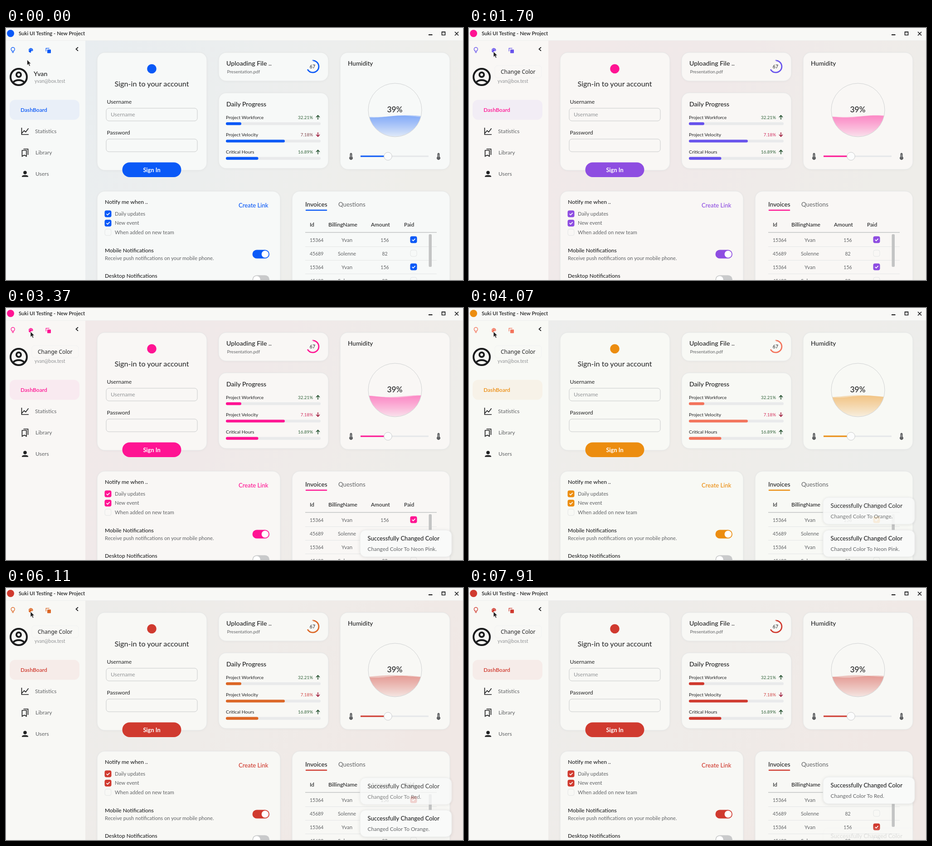
Recreate the animation shown at these times as an HTML page. Size 1008 by 556 pixels, loop 8000 ms.

```html
<!DOCTYPE html>
<html lang="en">
<head>
<meta charset="utf-8">
<title>Dashboard colour themes</title>
<style>
  html, body { margin: 0; width: 100%; height: 100%; overflow: hidden; }
  svg { display: block; width: 100%; height: 100%; }
  text { font-family: Lato, "Open Sans", sans-serif; fill: #202122; }
  .medium { font-weight: 500; }
  .semi { font-weight: 600; }
  .soft { fill: #626466; }
  .pale { fill: #929496; }
  .card { fill: var(--card); stroke: #e3e5e5; }
  .now { fill: var(--now); }
  .mid { fill: var(--mid); }
  .slow { fill: var(--slow); }
  .line { fill: none; stroke: #202122; stroke-width: 1.7; }
  .dark { fill: #202122; }
  .good { fill: #2f6238; }
</style>
</head>
<body>
<svg id="stage" viewBox="0 0 1008 556" xmlns="http://www.w3.org/2000/svg"></svg>
<script>
const LOOP = 8000;
const LEAVE = 270;

const themes = [
  { at: -9999, color: [10, 89, 247], card: [247, 249, 248], down: '#80444a',
    back: [[232, 237, 240], [236, 238, 238], [239, 238, 234]] },
  { at: 1605, color: [255, 20, 147], card: [249, 247, 245], down: '#cf2a5c',
    back: [[241, 233, 233], [240, 233, 233], [238, 237, 233]] },
  { at: 3615, color: [236, 141, 16], card: [248, 249, 245], down: '#d32c58',
    back: [[236, 237, 236], [240, 237, 233], [236, 237, 235]] },
  { at: 5700, color: [208, 58, 47], card: [248, 248, 245], down: '#cf4040',
    back: [[236, 236, 234], [239, 236, 233], [240, 232, 229]] }
];

const toasts = [
  { name: 'Neon Pink', enter: 1825, leave: 5650 },
  { name: 'Orange', enter: 3845, leave: 7730 },
  { name: 'Red', enter: 5920, leave: 9999 }
];

const clamp = v => Math.max(0, Math.min(1, v));
const easeOut = p => 1 - (1 - p) ** 2;
const smooth = p => p * p * (3 - 2 * p);
const rgb = c => `rgb(${c.map(Math.round).join()})`;
// Colours blend in linear light.
const mix = (a, b, p) => a.map((v, i) => (v ** 2.2 * (1 - p) + b[i] ** 2.2 * p) ** (1 / 2.2));

const text = (x, y, size, str, cls = '', anchor = 'start') =>
  `<text x="${x}" y="${y}" font-size="${size}" class="${cls}" text-anchor="${anchor}">${str}</text>`;
const box = (x, y, w, h, r, attrs = '') =>
  `<rect x="${x}" y="${y}" width="${w}" height="${h}" rx="${r}" ${attrs}/>`;
const disc = (x, y, r, attrs = '') => `<circle cx="${x}" cy="${y}" r="${r}" ${attrs}/>`;
const path = (d, attrs = 'class="line"') => `<path d="${d}" ${attrs}/>`;
const card = (x, y, w, h) => box(x, y, w, h, 17, 'class="card" filter="url(#shade)"');

const check = (x, y, on) => on
  ? box(x - 7.5, y - 7.5, 15, 15, 4, 'class="mid"') +
    path(`M${x - 3.4} ${y}l2.5 2.6 4.5-4.8`, 'fill="none" stroke="#fff" stroke-width="1.7"')
  : box(x - 7, y - 7, 14, 14, 4, 'fill="none" stroke="#e3e5e5"');

const toggle = (y, on) =>
  box(543.5, y, 37.5, 19, 9.5, on ? 'class="mid"' : 'fill="#c9cacb"') +
  disc(on ? 571.5 : 553, y + 9.5, 7.8, 'fill="#fff"');

const arrow = (y, up) => {
  const s = up ? 1 : -1;
  return path(`M688 ${y + 5 * s}V${y - 4 * s}M684 ${y}l4 ${-4 * s} 4 ${4 * s}`,
    up ? 'fill="none" stroke="#1f4d2a" stroke-width="1.6"'
       : 'fill="none" stroke="#9c1838" stroke-width="1.6"');
};

const progress = (y, label, value, up, width) =>
  text(485, y, 10.4, label) +
  `<text x="677" y="${y}" font-size="9.8" text-anchor="end" ${up ? 'class="good"' : 'style="fill:var(--down)"'}>${value}</text>` +
  arrow(y - 3.5, up) +
  box(485, y + 7.6, 209, 6.2, 3, 'fill="#e9eaeb"') + box(485, y + 7.6, width, 6.2, 3, 'class="slow"');

const thermometer = x =>
  path(`M${x - 2} 278a2 2 0 0 1 4 0v6a3.6 3.6 0 1 1-4 0z`, 'fill="#5f6163" stroke="#5f6163"') +
  path(`M${x} 279v6`, 'stroke="#ccc" stroke-width="1"');

const tableRow = (y, id, name, amount, paid) =>
  text(670, y, 10.5, id, 'soft') + text(752, y, 11.4, name, 'soft', 'middle') +
  text(835.5, y, 10.5, amount, 'soft', 'middle') + check(899, y - 4.5, paid) +
  path(`M660 ${y + 11}H950`, 'stroke="#e4e6e6"');

const toastMarkup = toast => `<g class="toast">` +
  box(781, 0, 202, 59, 12, 'fill="#f9faf9" stroke="#e9eaea" filter="url(#lift)"') +
  text(797.5, 23, 13.1, 'Successfully Changed Color', 'medium') +
  text(797.5, 46, 11.9, `Changed Color To ${toast.name}.`, 'soft') + `</g>`;

const windowFrame =
  box(0, 0, 1008, 556, 0, 'fill="url(#back)"') +
  box(0, 0, 175, 556, 0, 'class="card" style="stroke:none"') +
  box(0, 0, 1008, 27, 0, 'fill="#f8f8f6"') +
  path('M0 27.5H1008', 'stroke="#eeefee"') +
  disc(10, 12, 8, 'class="now"') +
  text(28, 16, 11.4, 'Suki UI Testing - New Project', 'semi') +
  path('M932 15H940.5', 'stroke="#111" stroke-width="2"') +
  path('M961.5 8.5h7v7h-7zM961 9h8M990 8.5l8 8m0-8l-8 8');

const sidebar =
  path('M13.4 51.5v-1.2a4 4 0 1 1 3.6 0v1.2zM13.4 54h3.6',
    'fill="none" stroke="var(--slow)" stroke-width="1.3"') +
  path('M54 44.2a5.2 5.2 0 0 0 0 10.2c1.5 0 1.6-1 1.1-1.7-.5-1 .2-1.7 1.2-1.7h1.5c3.2 0 2.5-6.8-3.8-6.8z', 'class="slow"') +
  [[51, 49.3], [52.5, 46.7], [55.5, 46.7], [57.3, 49]].map(([x, y]) => disc(x, y, .8, 'fill="#f7f9f8"')).join('') +
  box(91, 47.5, 8, 8, 1, 'class="slow"') +
  path('M88.3 51.5V44.7H95.5', 'fill="none" stroke="var(--slow)" stroke-width="1.3"') +
  path('M159 42.5l-4.5 4 4.5 4') +
  `<g fill="none" stroke="#1c1d1e" stroke-width="4">${disc(28, 108, 18)}${disc(28, 103, 5)}` +
  path('M15.5 120Q20 115 28 115T40.5 120', '') + `</g>` +
  text(61, 106, 14.2, 'Yvan', 'medium') + text(63, 121, 10.5, 'yvan@box.test', 'pale') +
  box(8, 158.5, 154, 44, 12, 'class="mid" opacity=".06"') +
  text(32, 185, 12.1, 'DashBoard', 'semi now') +
  path('M34.5 220V235H50M35 232l5-5.5 3.5 3 6-8') + text(64, 232, 12, 'Statistics', 'soft') +
  path('M35.5 270h9.5v13l-4.7-2.5-4.8 2.5zM38.5 267h10v13') + text(65, 279, 12, 'Library', 'soft') +
  disc(42, 319, 3.8, 'class="dark"') +
  path('M35 328.5v-1.5q1-2.5 7-2.5t7 2.5v1.5z', 'class="dark"') +
  text(65, 326, 12, 'Users', 'soft');

const signIn =
  card(201, 54, 242, 260) + disc(321.5, 90, 10.3, 'class="now"') +
  text(321.5, 129, 16.2, 'Sign-in to your account', '', 'middle') +
  text(222.5, 167, 12.3, 'Username') + text(222.5, 235, 12.2, 'Password') +
  [177, 245].map(y => box(221, y, 201, 28, 6, 'fill="none" stroke="#c8caca"')).join('') +
  text(231, 195, 12.1, 'Username', 'pale') +
  box(256.5, 296.5, 130, 32.5, 16.2, 'class="mid"') +
  `<text x="321.5" y="317.5" font-size="12.8" font-weight="700" text-anchor="middle" style="fill:#fff">Sign In</text>`;

const middle =
  card(469, 54, 242, 63) + text(486, 83, 14.2, 'Uploading File ..', 'medium') +
  text(487.5, 99.5, 10, 'Presentation.pdf', 'soft') +
  disc(676.7, 85, 13.2, 'pathLength="100" fill="none" stroke="var(--slow)" stroke-width="2.8" stroke-dasharray="67 33" transform="rotate(-90 676.7 85)"') +
  text(676, 89, 10.6, '67', '', 'middle') +
  card(469, 143, 242, 167) + text(486, 173, 14.1, 'Daily Progress', 'medium') +
  progress(200.5, 'Project Workforce', '32.21%', true, 34) +
  progress(238.8, 'Project Velocity', '7.18%', false, 130) +
  progress(277, 'Critical Hours', '16.89%', true, 71.5);

const humidity =
  card(737, 54, 242, 258) + text(754, 83, 13.6, 'Humidity', 'medium') +
  `<g clip-path="url(#dial)"><path id="rear" fill="url(#water)"/><path id="front" fill="url(#water)"/></g>` +
  disc(858, 181, 59, 'fill="none" stroke="#d0d2d3"') +
  text(857.5, 185.5, 17.4, '39%', 'medium', 'middle') +
  thermometer(761) + thermometer(954) +
  path('M782 283H932', 'stroke="#e5e7e9" stroke-width="3"') +
  path('M782 283H842', 'stroke="var(--now)" stroke-width="3"') +
  disc(842.5, 283, 8.8, 'fill="#fbfcfc" stroke="#c9cbcc"');

const notify =
  card(201, 360, 404, 240) + text(218, 388, 12.2, 'Notify me when ..', 'medium') +
  text(513, 395.5, 13.1, 'Create Link', 'medium mid') +
  ['Daily updates', 'New event', 'When added on new team'].map((label, i) =>
    check(225, 410 + i * 20.4, i < 2) + text(240, 414 + i * 20.4, 11.3, label, 'soft')).join('') +
  text(218, 495, 12, 'Mobile Notifications', 'medium') +
  text(218, 511.5, 11.2, 'Receive push notifications on your mobile phone.', 'soft') +
  toggle(489.5, true) +
  text(218, 551, 12, 'Desktop Notifications', 'medium') + toggle(545.5, false);

const invoices =
  card(631, 360, 348, 240) + text(660, 394, 13.6, 'Invoices', 'medium') +
  text(733, 394, 13.3, 'Questions', 'soft') +
  path('M662 402H707', 'stroke="var(--now)" stroke-width="2.6" stroke-linecap="round"') +
  text(670, 437.5, 11.8, 'Id', 'medium') + text(711, 437.5, 12.1, 'BillingName', 'medium') +
  text(805, 437.5, 11.8, 'Amount', 'medium') + text(878, 437.5, 11.8, 'Paid', 'medium') +
  path('M660 451H950', 'stroke="#c2c4c4" stroke-width="1.5"') +
  [471.5, 501.5, 531.5, 561.5].map((y, i) => i % 2
    ? tableRow(y, '45689', 'Solenne', '82', false)
    : tableRow(y, '15364', 'Yvan', '156', true)).join('') +
  box(932.5, 455, 6.5, 72, 2, 'fill="#c3c4c4"');

const stage = document.getElementById('stage');
stage.innerHTML = `<defs>
  <linearGradient id="back" x1="0" y1="0" x2="1" y2=".35">
    <stop offset=".15" stop-color="var(--back0)"/><stop offset=".55" stop-color="var(--back1)"/>
    <stop offset="1" stop-color="var(--back2)"/></linearGradient>
  <linearGradient id="water" gradientUnits="userSpaceOnUse" x1="0" y1="192" x2="0" y2="240">
    <stop offset="0" stop-color="var(--now)" stop-opacity=".29"/>
    <stop offset="1" stop-color="var(--now)" stop-opacity=".05"/></linearGradient>
  <clipPath id="dial">${disc(858, 181, 58.5)}</clipPath>
  <filter id="shade"><feDropShadow dx="0" dy="1" stdDeviation="2" flood-opacity=".03"/></filter>
  <filter id="lift" x="-10%" y="-30%" width="120%" height="160%">
    <feDropShadow dx="0" dy="1" stdDeviation="3" flood-opacity=".1"/></filter>
</defs>` + windowFrame + sidebar + signIn + middle + humidity + notify + invoices +
  `<g id="tip">${box(57, 83, 103, 27, 6, 'class="card" style="stroke:#f1f2f2"')}
   <text x="70" y="101" font-size="12" style="font-family:'Noto Sans',sans-serif">Change Color</text></g>` +
  toasts.map(toastMarkup).join('') +
  path('M0 0V12.2L2.8 9.6 4.9 14.2 7 13.2 5 8.8H8.7Z', 'id="pointer" fill="#222" stroke="#fff" stroke-width=".7"');

const find = id => document.getElementById(id);
const [rear, front, tip, pointer] = ['rear', 'front', 'tip', 'pointer'].map(find);
const toastNodes = stage.querySelectorAll('.toast');

function wave(level, height, length, phase) {
  let d = 'M798 242';
  for (let x = 798; x <= 918; x += 3) {
    d += `L${x} ${(level + height * Math.sin((x - 798) / length * 2 * Math.PI + phase)).toFixed(2)}`;
  }
  return d + 'L918 242Z';
}

function paintTheme(t) {
  const index = themes.findLastIndex(theme => t >= theme.at);
  const theme = themes[index];
  const before = themes[Math.max(0, index - 1)];
  const part = span => clamp((t - theme.at) / span);
  const set = (name, value) => stage.style.setProperty('--' + name, value);
  set('now', rgb(theme.color));
  set('mid', rgb(mix(before.color, theme.color, part(350))));
  set('slow', rgb(mix(before.color, theme.color, part(700))));
  set('card', rgb(mix(before.card, theme.card, part(100))));
  set('down', theme.down);
  theme.back.forEach((c, i) => set('back' + i, rgb(mix(before.back[i], c, part(100)))));
}

function paintToasts(t) {
  toasts.forEach((toast, i) => {
    const shown = easeOut(clamp((t - toast.enter) / 350));
    const gone = easeOut(clamp((t - toast.leave) / LEAVE));
    const slot = toasts.slice(0, i).filter(other => t < other.leave + LEAVE).length;
    const y = 490 - 73 * slot + 8 * (1 - shown) + 44 * gone;
    toastNodes[i].setAttribute('transform', `translate(0 ${y.toFixed(2)})`);
    toastNodes[i].setAttribute('opacity', shown * (1 - gone));
  });
}

function render(t) {
  paintTheme(t);
  paintToasts(t);
  const drift = (t - 1700) / 298;
  rear.setAttribute('d', wave(194.5, 2, 140, drift + .2));
  front.setAttribute('d', wave(195.5, 2.3, 130, drift * .9));
  const move = smooth(clamp((t - 30) / 500));
  pointer.setAttribute('transform', `translate(${46.5 + 7.5 * move} ${70 - 18 * move})`);
  tip.setAttribute('opacity', t < 750 ? 0 : 1);
}

const start = performance.now();
function tick() {
  render((performance.now() - start) % LOOP);
  requestAnimationFrame(tick);
}
render(0);
requestAnimationFrame(tick);
</script>
</body>
</html>
```
